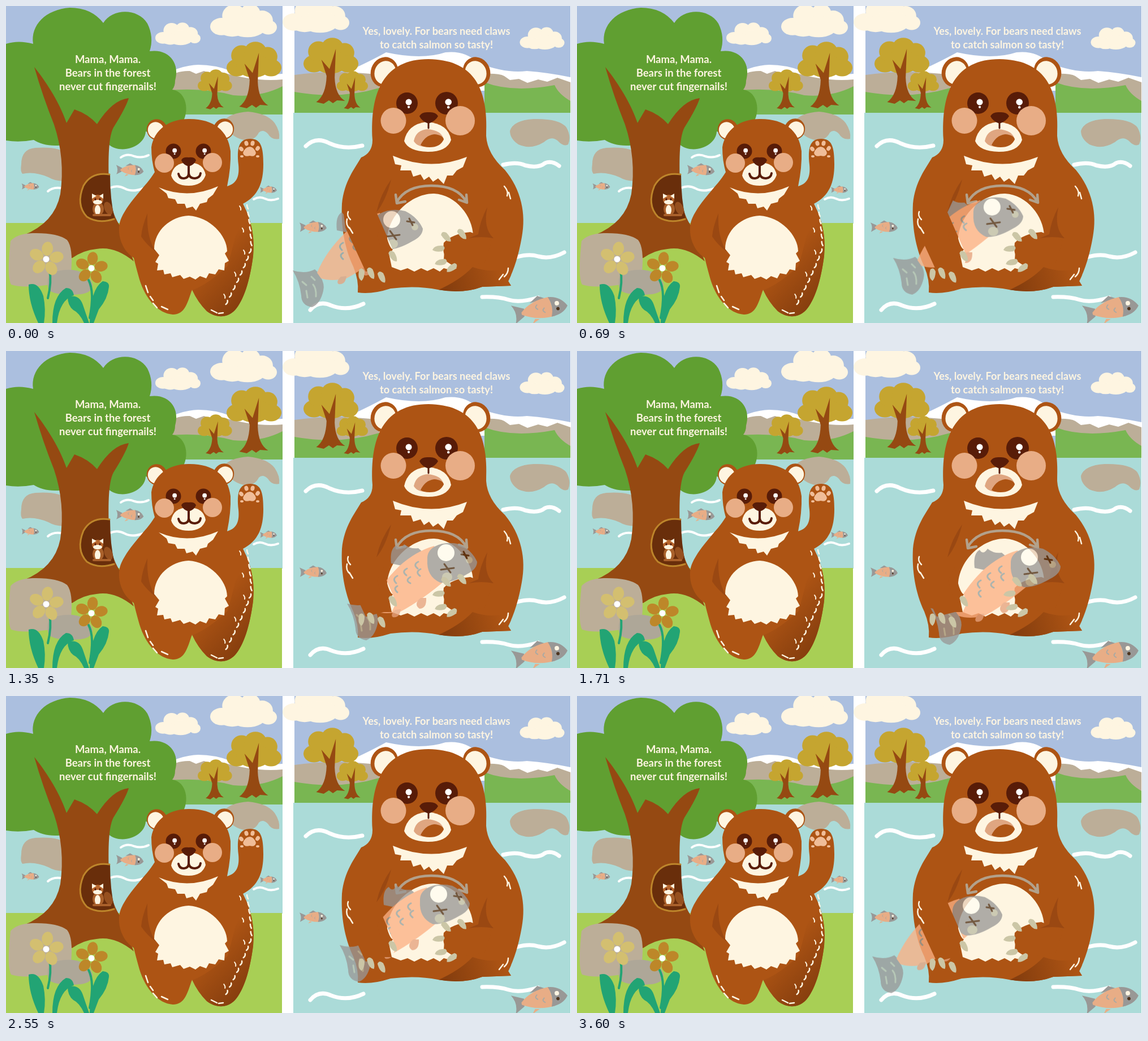
An HTML page with a canvas that plays this animation: 999x561 px, repeating every 3800 ms.

```html
<!DOCTYPE html>
<html lang="en">
<head>
<meta charset="utf-8">
<title>Bears by the river</title>
<style>
html, body { margin: 0; width: 100%; height: 100%; overflow: hidden; background: #fff; }
canvas { display: block; }
</style>
</head>
<body>
<canvas id="stage" width="999" height="561"></canvas>
<script>
const W = 999, H = 561, LOOP = 3800, STEP = 30, LAST = 3600;
const BEAR = '#ad5414', SHADE = '#9a4812', DARK = '#581c08', CREAM = '#fef5e1',
  PINK = '#e8ad86', STONE = '#bcae98', RIVER = '#abdbd8', SKY = '#abbfdf',
  HILL = '#79b652', TEAL = '#22a474', CLAW = '#cbc6a6', GREY = '#999896', TRUNK = '#954912';

const stage = document.getElementById('stage').getContext('2d');
const layer = () => Object.assign(document.createElement('canvas'), { width: W, height: H }).getContext('2d');
const scene = layer(), fishLayer = layer();
let g = scene;

const fill = (d, c) => { g.fillStyle = c; g.fill(new Path2D(d)); };
const line = (d, c, w) => {
  g.strokeStyle = c; g.lineWidth = w; g.lineCap = g.lineJoin = 'round';
  g.stroke(new Path2D(d));
};
const oval = (x, y, rx, ry, c, turn = 0) => {
  g.fillStyle = c; g.beginPath(); g.ellipse(x, y, rx, ry, turn, 0, 7); g.fill();
};
const box = (x, y, w, h, c) => { g.fillStyle = c; g.fillRect(x, y, w, h); };
const placed = (x, y, scale, turn, draw) => {
  g.save(); g.translate(x, y); g.rotate(turn); g.scale(scale, scale); draw(); g.restore();
};
const shaded = (body, x0, y0, x1, y1, part) => {
  const tone = g.createLinearGradient(x0, y0, x1, y1);
  tone.addColorStop(0, BEAR); tone.addColorStop(1, '#863e0e');
  g.save(); g.clip(new Path2D(body)); fill(part, tone); g.restore();
};

// Unit: 100 wide, 50 high, centred
function cloud(x, y, w) {
  placed(x, y, w / 100, 0, () => {
    oval(-33, 8, 17, 13, CREAM); oval(-14, -8, 18, 17, CREAM); oval(10, -12, 15, 14, CREAM);
    oval(28, -1, 16, 15, CREAM); oval(37, 9, 13, 11, CREAM); oval(6, 8, 28, 16, CREAM);
    oval(-17, 11, 20, 12, CREAM);
  });
}

function goldTree(x, y, w, foot) {
  const k = w / 94, base = (foot - y) / k;
  placed(x, y, k, 0, () => {
    const c = '#c5a530';
    oval(-29, 11, 18, 15, c); oval(-21, -10, 18, 18, c); oval(3, -17, 19, 17, c);
    oval(24, -8, 17, 17, c); oval(30, 11, 18, 15, c); oval(0, 8, 30, 20, c);
    fill(`M-16 4L-2 20L9 -15L7 35Q8 ${base - 14} 25 ${base - 4}L11 ${base - 5}L4 ${base}
      L-3 ${base - 5}L-12 ${base + 1}L-25 ${base - 2}Q-8 ${base - 14} -7 32Z`, TRUNK);
  });
}

function littleFish(x, y, w, turn = 0) {
  placed(x, y, w / 50, turn, () => {
    fill('M-25 -8L-14 -3L-15 4L-24 9Q-20 0 -25 -8Z', GREY);
    fill('M-8 -7L0 -12L7 -8Z', GREY);
    fill('M-17 0Q-7 -9 10 -9L12 9Q-4 10 -17 2Z', PINK);
    fill('M9 -9Q20 -8 25 2Q20 9 9 9Q13 0 9 -9Z', GREY);
    fill('M-6 8L-9 12L-2 9Z', PINK);
    oval(16, -2, 2, 2, CREAM); oval(16, 3, 1.5, 1.5, '#4e3520');
    line('M-2 -4q-3 2 0 4M4 0q-3 2 0 4', '#a9a9a3', 1);
  });
}

function flower(x, y, r, c) {
  for (let i = 0; i < 5; i++) {
    const a = -1.45 + i * Math.PI * 0.4;
    oval(x + Math.cos(a) * r * 0.6, y + Math.sin(a) * r * 0.6, r * 0.4, r * 0.32, c, a);
  }
  oval(x, y, 5.5, 5.5, '#fff');
}

function eye(x, y, r) {
  oval(x, y, r, r, DARK);
  oval(x + r * 0.16, y - r * 0.1, r * 0.29, r * 0.29, '#fff');
  oval(x + r * 0.16, y + r * 0.36, r * 0.11, r * 0.11, '#fff');
}

function ear(x, y, rx, ry, turn) {
  oval(x, y, rx, ry, BEAR, turn);
  oval(x + turn * 4, y + 1, rx * 0.78, ry * 0.78, CREAM, turn);
}

function words(lines, x, y, size) {
  g.font = `700 ${size}px Lato, "Open Sans", sans-serif`;
  g.textAlign = 'center'; g.fillStyle = CREAM;
  lines.forEach((t, i) => g.fillText(t, x, y + i * 24));
}

function leftPage() {
  box(0, 0, 489, 194, SKY);
  fill('M260 130Q310 104 340 104Q370 104 398 115Q440 124 489 120V160H260Z', '#fff');
  fill('M280 130Q300 114 325 115L336 120L350 115L365 120L378 116Q440 135 489 130V165H280Z', STONE);
  fill('M0 141L19 151L0 160Z', STONE);
  fill('M280 150Q345 143 402 158Q450 162 489 142V193H280Z', HILL);
  box(0, 192, 489, 193, RIVER);
  box(0, 384, 488, 177, '#a8cf55');
  cloud(304, 50, 80); cloud(420, 27, 118);
  goldTree(438, 98, 96, 180); goldTree(369, 134, 60, 182);
  fill('M384 205Q395 189 428 187Q462 190 475 207Q485 222 483 235Q470 238 463 226Q454 217 447 224Q440 239 420 237Q396 232 384 205Z', STONE);
  fill('M27 280Q27 253 52 251Q95 248 111 263V309Q90 312 75 303Q50 292 29 297Q25 293 27 280Z', STONE);
  line('M203 268Q214 260 227 266Q240 270 252 264M74 328Q84 319 101 323M184 322Q197 316 210 323T242 323M438 342Q448 336 458 341T481 341', '#fff', 4);
  littleFish(219, 290, 49, .04); littleFish(43, 319, 31); littleFish(464, 325, 30);

  fill(`M0 67Q22 60 48 67C43 34 70 6 113 3Q151 3 172 30C188 4 233 3 250 31Q262 55 254 80
    C288 75 308 101 299 132Q299 142 294 148C320 152 325 187 311 208C298 230 266 229 247 222
    C246 248 204 265 180 244C158 250 135 239 125 236C101 253 65 248 49 237Q23 242 0 238Z`, '#609f31');
  fill(`M50 108C67 129 94 168 107 207L121 183Q145 191 161 209Q188 166 217 163Q212 180 190 215
    C180 234 181 278 182 321Q185 365 201 388L226 452Q192 424 160 430Q137 432 117 446Q81 437 30 406
    Q86 384 96 333Q105 270 85 210Q65 160 50 108Z`, TRUNK);
  fill('M184 298Q151 293 137 318Q123 352 143 373Q163 386 192 376Q184 342 184 298Z', '#692e0b');
  line('M183 298Q151 293 137 318Q123 352 143 373Q163 386 191 377', '#bd852b', 3);
  oval(181, 358, 7, 12, '#96501f', -.4); oval(163, 359, 10, 12, '#aa612b');
  oval(162, 361, 5, 9, CREAM); oval(162, 343, 10, 9, '#b8672e');
  fill('M152 341L152 332L160 336ZM165 336L172 332L172 341Z', CREAM);
  oval(162, 347, 8, 4, CREAM); oval(158, 342, 1.6, 2, DARK); oval(166, 342, 1.6, 2, DARK);
  line('M155 370H184', '#aa612b', 4);

  fill('M8 416Q19 403 47 402Q91 401 108 414Q119 428 115 471Q112 488 91 491Q33 501 9 493Q1 479 8 416Z', STONE);
  fill('M76 477Q90 465 118 467Q147 471 153 493Q153 507 133 510Q92 514 76 503Q71 490 76 477Z', '#aea798');
  line('M77 468Q81 488 74 517M146 485Q157 506 148 552', TEAL, 4);
  fill('M40 493Q57 487 66 513Q71 537 67 561H57Q40 525 40 493Z', TEAL);
  fill('M82 561Q82 513 106 499Q118 499 120 512Q95 520 90 561Z', TEAL);
  fill('M109 515Q129 509 136 529Q141 544 147 561H138Q130 543 119 538Q109 530 109 515Z', TEAL);
  fill('M148 561Q149 501 171 487Q183 488 182 497Q180 518 164 537L155 561Z', TEAL);
  flower(71, 448, 31, '#d3bf70'); flower(151, 464, 29, '#bd8729');
}

function cub() {
  const body = `M257 250C262 218 290 199 325 200C367 200 393 221 397 257Q398 285 391 319
    C408 314 413 302 411 281C408 252 411 235 432 235C451 235 455 250 455 280
    C455 313 446 336 419 350C435 382 440 410 437 442C431 488 420 521 405 538
    C390 554 369 551 355 540Q339 524 329 502C321 524 317 546 295 546
    C269 544 247 519 236 484Q230 463 226 446C200 429 195 394 204 375C219 343 247 320 263 294Q257 274 257 250Z`;
  ear(267, 219, 18, 19, -.5); ear(385, 218, 18, 19, .5);
  fill(body, BEAR);
  shaded(body, 355, 455, 425, 520, 'M328 503Q354 495 392 460L418 360H450V560H340Z');
  fill('M250 367Q240 392 239 408Q249 423 265 435Q248 410 250 367Z', SHADE);
  fill(`M262 430C262 397 292 372 323 371C360 373 391 406 391 434L387 438L394 451L387 455L386 468L376 466L370 475
    L359 473L354 482L343 478L335 484L325 479L314 483L308 476L294 480L291 473L280 475L278 467L267 468L269 456L264 453L271 441Z`, CREAM);
  fill('M270 321Q322 343 375 319L366 334L357 341L355 347L343 350L336 362L330 355L319 358L316 350L303 350L299 342L287 340L284 332Z', CREAM);
  eye(296, 257, 13.5); eye(349, 257, 13.5);
  oval(280, 278, 17, 17, PINK); oval(365, 277, 17, 17, PINK);
  fill('M292 300Q296 277 323 277Q349 277 353 299Q347 318 323 318Q298 318 292 300Z', CREAM);
  fill('M310 273Q312 267 323 268Q334 267 336 273Q333 281 323 284Q313 281 310 273Z', DARK);
  line('M323 282V300M305 297Q307 306 315 305Q323 304 323 296Q324 305 334 305Q343 304 344 296', DARK, 4);
  const pad = '#f0bd98';
  fill('M431 249Q439 250 442 260Q440 268 431 265Q421 268 419 260Q422 250 431 249Z', pad);
  for (const [x, y] of [[416, 253], [425, 243], [436, 243], [445, 252]]) oval(x, y, 3.5, 4.5, pad, (x - 431) / 22);
  oval(417, 266, 3, 2, pad); oval(445, 266, 3, 2, pad);
  // Fur strokes follow the right flank down to the foot
  for (let i = 0; i < 14; i++) {
    const y = 352 + i * 13, x = 426 + 7 * Math.sin(i / 4) - Math.max(0, i - 6) * 4.8;
    line(`M${x} ${y}q${i < 6 ? 0 : 1} 4 ${i < 6 ? 2 : -3} 7`, CREAM, 2.5);
    if (i % 3 === 0) line(`M${x - 13} ${y + 2}q3 4 2 7`, CREAM, 2);
  }
  line('M247 495L251 507M255 514L260 521M260 526L267 534M275 532L286 537M363 538L373 543M376 544L384 543', CREAM, 2.5);
}

function rightPage() {
  box(510, 0, 488, 192, SKY);
  fill('M590 122Q640 100 672 82Q735 96 777 82Q812 78 835 101Q885 120 921 115Q960 118 998 126V150H590Z', '#fff');
  fill('M510 122Q585 112 660 122V170H510ZM846 120Q872 119 881 124L891 131L907 129L922 136L941 130L957 134L975 127L998 135V168H846Z', STONE);
  fill('M510 152Q590 166 660 145V192H510ZM846 135Q895 154 970 140Q977 156 998 168V192H846Z', HILL);
  box(508, 189, 490, 372, RIVER);
  cloud(548, 19, 118); cloud(948, 58, 79);
  goldTree(574, 91, 96, 172); goldTree(612, 135, 55, 182);
  fill('M891 221Q897 202 933 200Q979 199 991 215Q1000 231 994 245Q986 250 975 238Q964 229 951 241Q928 255 906 245Q891 235 891 221Z', STONE);
  line('M530 248Q548 230 572 243Q599 255 630 247M879 281Q903 275 918 282Q941 288 953 278Q965 273 978 283M904 444Q925 438 941 443Q963 449 987 436M538 538Q553 520 575 530Q603 541 632 527M842 515Q870 514 889 520T941 516', '#fff', 7);
  littleFish(543, 391, 48); littleFish(944, 536, 98, -.2);
}

function mother() {
  const body = `M648 237C643 151 669 94 747 94C822 95 854 139 849 230Q851 262 882 290
    C911 325 920 368 912 409Q904 455 888 487L893 495L842 497Q807 510 764 502Q725 494 680 500
    Q646 511 622 507Q624 485 614 461C598 427 592 388 594 350C598 310 617 287 628 268Q648 260 648 237Z`;
  ear(669, 117, 24, 27, .35); ear(832, 117, 24, 27, -.35);
  fill(body, BEAR);
  shaded(body, 880, 472, 780, 500, 'M763 503Q802 486 825 462Q860 474 890 462L900 515H765Z');
  fill('M681 307Q662 333 655 365Q672 344 681 307Z', SHADE);
  fill(`M676 433C663 379 714 331 757 332C796 334 825 373 826 406L776 419L774 449L797 464L789 468
    L774 464L767 470L756 464L745 469L734 464L722 470L710 464L698 468L682 462Z`, CREAM);
  fill('M668 382Q675 427 684 431L669 450L656 405Z', BEAR);
  fill('M774 419Q789 403 821 400L859 415L846 454L804 462Q768 454 774 419Z', BEAR);
  fill('M851 356Q838 381 835 404L818 411Q841 407 862 411Q843 393 851 356Z', SHADE);
  fill(`M684 265Q750 293 815 267L808 285L797 291L790 300L780 300L774 315L764 305L755 311L748 302L739 308
    L733 298L720 302L716 291L697 291L699 282L688 280Z`, CREAM);
  eye(709, 172, 19); eye(779, 172, 20);
  oval(685, 203, 22.5, 23, PINK); oval(803, 203, 26, 26, PINK);
  fill('M704 239Q710 209 744 205Q782 208 787 237Q780 258 746 258Q711 257 704 239Z', CREAM);
  fill('M721 239Q725 219 746 218Q770 220 774 236Q766 249 746 249Q727 250 721 239Z', '#dfa681');
  fill('M733 246Q741 229 757 227Q772 228 774 236Q768 250 749 250Q738 250 733 246Z', BEAR);
  fill('M731 195Q735 187 747 188Q760 187 764 195Q759 204 747 208Q735 204 731 195Z', DARK);
  line('M747 205V216', DARK, 3);
  line('M605 364Q602 371 609 378M603 377Q600 388 609 395M607 392L613 402M881 319Q889 328 886 336M889 330L892 341M888 464Q888 473 881 479M879 475L872 484', CREAM, 2.5);
  line('M691 347Q707 318 752 318Q799 318 814 347M689 334L691 349L706 346M801 343L815 348L814 334', '#b3a18b', 4.5);
}

function salmon() {
  g = fishLayer;
  fill('M585 397Q582 371 594 365Q600 375 608 363Q619 372 633 370L640 376L604 401Z', GREY);
  fill('M507 468Q530 475 546 466Q553 472 556 479Q564 492 561 504Q556 527 541 533Q522 530 522 512Q519 487 507 468Z', GREY);
  line('M524 488L531 494M540 479L546 485M543 493Q549 500 548 514M531 504L533 516', '#b9c1ad', 3);
  fill('M550 472Q566 434 599 402Q629 375 661 366L684 424Q641 461 602 482Q575 488 557 482Z', '#fcb084');
  fill('M592 479Q583 488 588 492Q600 494 602 478ZM637 458Q624 469 635 477Q648 477 647 458Z', '#e6a27d');
  line('M633 394Q623 399 632 406M637 407Q627 412 636 419M613 406Q603 411 612 418M619 421Q609 427 619 432M596 419Q586 424 594 432M596 437Q588 441 596 448', '#94a09f', 3);
  fill('M649 390Q648 375 662 367Q681 357 706 363Q728 374 737 394Q737 407 719 416Q692 432 672 431Q647 420 649 390Z', GREY);
  oval(682, 378, 15, 15, '#fffdf2');
  oval(684, 421, 9, 8, '#bdbda6'); oval(723, 391, 6, 6, '#bdbda6');
  line('M673 408L696 405M679 398L690 413M709 381L722 383M713 376L719 388', '#4a2a10', 3);
  g = scene;
}

function claws(ctx) {
  g = ctx;
  for (const [x, y, turn] of [[628, 475, .2], [645, 473, -.25], [664, 480, -.3], [684, 443, -.4], [778, 409, -.6], [765, 429, 1.6], [769, 453, 1.5], [788, 463, 1.1], [806, 404, -.5]])
    placed(x, y, 1, turn, () => fill('M-5 -8Q0 -14 5 -6Q7 5 3 11Q-6 8 -5 -8Z', CLAW));
  g = scene;
}

const mix = (keys, v) => {
  const i = Math.max(1, keys.findIndex(k => k[0] >= v));
  const [a, p] = keys[i - 1], [b, q] = keys[i];
  return p + (q - p) * (v - a) / (b - a);
};
const ACROSS = [[0, 0], [540, 41], [1080, 80], [1350, 96], [1620, 115], [1800, 121], [2100, 107], [2700, 75], [3240, 40], [3600, 15]];
const RISE = [[0, 0], [29, -14], [54, -23], [75, -31], [96, -21], [121, -12]];

// The fish passes behind the left forearm
const outsideArm = new Path2D('M0 0H999V561H0ZM594 345L682 307L655 365L690 445L682 462L668 462L636 470L600 392Z');

leftPage(); cub(); rightPage(); mother(); salmon();
words(['Mama, Mama.', 'Bears in the forest', 'never cut fingernails!'], 180, 101, 18.5);
words(['Yes, lovely. For bears need claws', 'to catch salmon so tasty!'], 761, 51, 18.2);

function draw(now) {
  const t = Math.min(LAST, Math.floor(now % LOOP / STEP) * STEP);
  const x = mix(ACROSS, t), y = mix(RISE, x);
  stage.fillStyle = '#fff';
  stage.fillRect(0, 0, W, H);
  stage.drawImage(scene.canvas, 0, 0);
  stage.save();
  stage.clip(outsideArm, 'evenodd');
  stage.globalAlpha = 0.77;
  stage.drawImage(fishLayer.canvas, x, y);
  stage.restore();
  claws(stage);
  requestAnimationFrame(draw);
}
draw(0);
</script>
</body>
</html>
```
